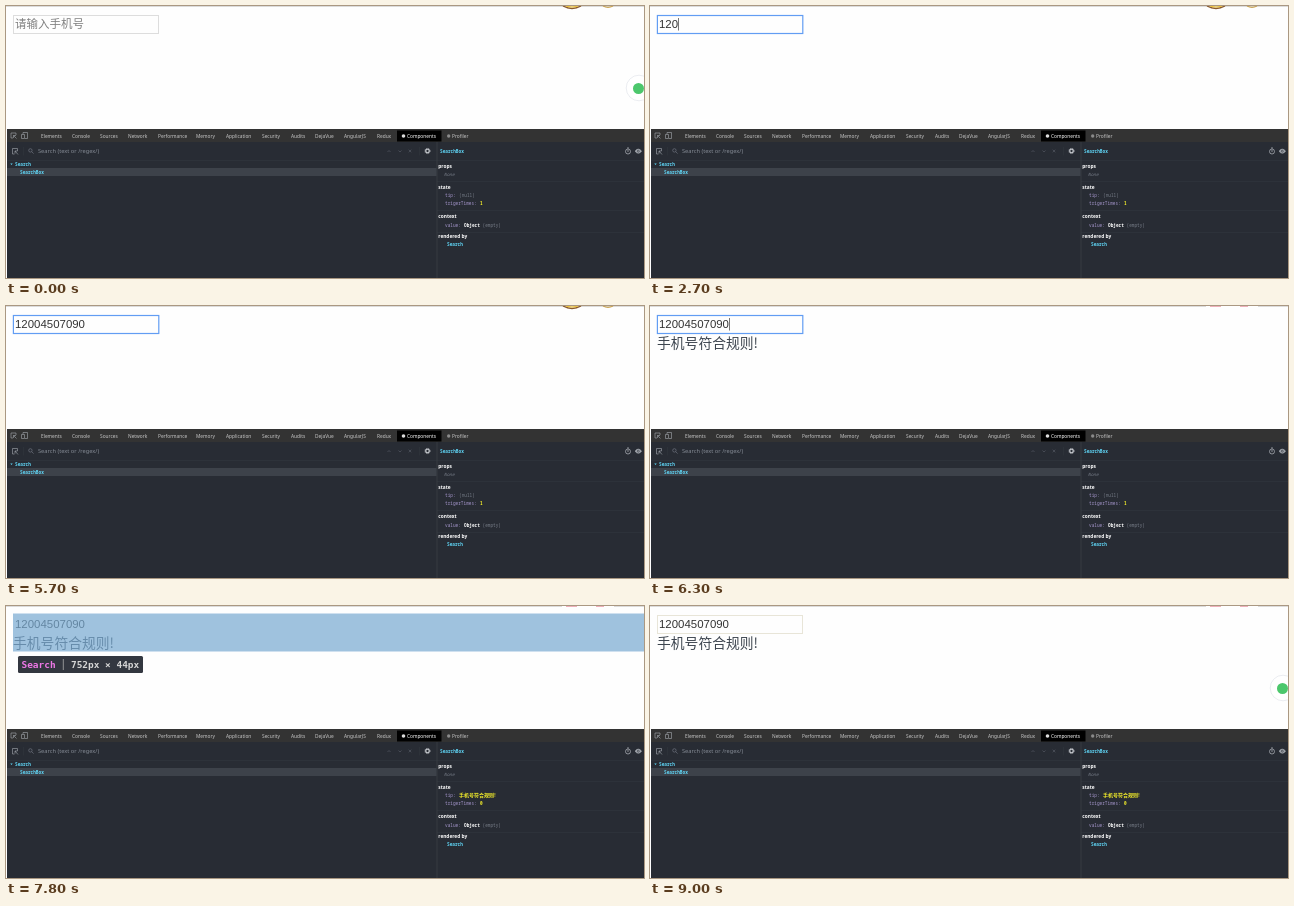
Recreate the animation shown at these times as an HTML page. Size 638 by 272 pixels, loop 9500 ms.

```html
<!DOCTYPE html>
<html>
<head>
<meta charset="utf-8">
<title>Phone input check</title>
<style>
html, body { margin: 0; width: 100%; height: 100%; overflow: hidden; background: #fefefe; }
svg { display: block; width: 638px; height: 272px; }
text { white-space: pre; }
[data-on] { visibility: hidden; }
.cjk { font-family: "Noto Sans CJK SC", "Noto Sans CJK", sans-serif; font-weight: 300; }
.ui { font: 4.8px "Noto Sans", sans-serif; fill: #c8c8c8; }
.head { font: bold 4.8px "Noto Sans", sans-serif; fill: #fff; }
.mono { font: 4.42px "Noto Sans Mono", "DejaVu Sans Mono", monospace; }
.tag { fill: #61dafb; font-weight: 600; }
.key { fill: #a596cc; }
.dim { fill: #777d88; }
.val { fill: #f4ee2a; font-weight: 600; }
.line { stroke: #3d424a; stroke-width: .7; fill: none; }
.faint { stroke: #30353d; }
.icon { stroke: #a5a9b0; stroke-width: .6; fill: none; }
</style>
</head>
<body>
<svg viewBox="0 0 638 272">
  <path d="M0 .5H638" stroke="#dcdcdc"/>

  <!-- Edge of the page content above -->
  <g data-on="0-6000" fill="none">
    <path d="M557 0Q566 5 575 0" stroke="#8a5a2c" stroke-width="1.4"/>
    <path d="M560 0Q566 2 572 0" stroke="#f0c232" stroke-width="1.2"/>
    <path d="M597 0Q602 2.6 607 0" stroke="#c9a455" stroke-width="1.3"/>
  </g>
  <g data-on="6000-9500">
    <path d="M556 .5H608" stroke="#fefefe"/>
    <path d="M560 .5H571M590 .5H598" stroke="#eeb0ba"/>
  </g>

  <!-- Floating button -->
  <g id="badge">
    <circle cx="633" cy="82" r="12.8" fill="#fff" stroke="#e6e9ee" stroke-width=".8"/>
    <circle cx="632.5" cy="82.5" r="5.5" fill="#4cc76c"/>
  </g>

  <!-- Phone field -->
  <rect data-on="0-800" x="7.5" y="9.5" width="145" height="18" fill="none" stroke="#dddddd"/>
  <rect data-on="8000-9500" x="7.5" y="9.5" width="145" height="18" fill="none" stroke="#e8e5d8"/>
  <rect data-on="800-7100" x="7.4" y="9.5" width="145.4" height="18" fill="none" stroke="#629df3" stroke-width="1.2"/>
  <text data-on="0-2100" class="cjk" x="9" y="22.3" font-size="11.5" fill="#808080">请输入手机号</text>
  <text id="phone" x="9" y="22" font-family="Liberation Sans, Arial, sans-serif" font-size="11.45" fill="#333"></text>
  <rect data-on="800-1300" x="9" y="12" width="1" height="13" fill="#333"/>
  <rect data-on="1800-2100" x="8" y="12" width="2" height="13" fill="#000"/>
  <rect id="caret" data-on="2100-5700 6200-6600" y="12" width=".8" height="12.5" fill="#555"/>
  <text data-on="6200-9500" class="cjk" x="7" y="42.4" font-size="13.8" fill="#3c444e">手机号符合规则!</text>

  <!-- Element highlight -->
  <g data-on="7800-8000">
    <rect x="7" y="7.5" width="631" height="38" fill="rgb(120,170,210)" fill-opacity=".7"/>
    <rect x="12" y="50" width="125" height="17" rx="1.5" fill="#333740"/>
    <path d="M57.3 53V64" stroke="#aaa" stroke-width=".8"/>
    <g font-family="DejaVu Sans Mono, monospace" font-weight="bold" font-size="9.45">
      <text x="15.5" y="62" fill="#ee78e6">Search</text>
      <text x="65" y="62" fill="#d7d7d7">752px × 44px</text>
    </g>
  </g>

  <!-- Developer tools -->
  <rect x="1" y="123" width="637" height="149" fill="#282c34"/>
  <rect x="1" y="123" width="637" height="13" fill="#333"/>
  <rect x="391" y="124.5" width="44.5" height="11" fill="#000"/>
  <g id="tabs" class="ui"></g>
  <circle cx="397.5" cy="130" r="1.8" fill="#ddd"/>
  <circle cx="442.7" cy="130" r="1.7" fill="#8a8a8a"/>
  <g class="icon">
    <path d="M10 129V127H5V132H7M7.5 129.5L10.5 132.5M7.5 132V129.5H10"/>
    <path d="M17 128V126.5H21.5V132.5H19M15.5 128.5H18.5V132.5H15.5Z"/>
    <path d="M11.5 145V142.5H6.5V148H8.5M9 145L12 148.5M9 147.5V145H11.5"/>
    <circle cx="24.4" cy="144.4" r="1.7" stroke="#777d88"/>
    <path d="M25.7 145.7L27.6 147.6" stroke="#777d88"/>
    <path d="M381.5 146L383 144.5L384.5 146M392.5 144.5L394 146L395.5 144.5M402.7 143.7L405.3 146.3M405.3 143.7L402.7 146.3" stroke="#5b616b"/>
    <circle cx="421.5" cy="145" r="1.8" stroke="#c4c7cc" stroke-width="1.3"/>
    <circle cx="421.5" cy="145" r="2.7" stroke="#c4c7cc" stroke-dasharray="1.1"/>
    <circle cx="622" cy="145.5" r="2.5" stroke-width=".8"/>
    <path d="M621 142H623M622 144V146" stroke-width=".8"/>
    <path d="M629 145.2Q632.3 141 635.6 145.2Q632.3 149.4 629 145.2Z" fill="#a5a9b0"/>
    <circle cx="632.3" cy="145.2" r="1" fill="#a5a9b0" stroke="#282c34"/>
  </g>
  <text class="ui" x="32" y="147" style="font-size:5.7px;fill:#858b95">Search (text or /regex/)</text>
  <path class="line faint" d="M1 154.5H638M17.5 141V149.5M413.5 141V149.5M431 175.5H638M431 204.5H638M431 226.5H638"/>
  <path class="line" d="M431 136V272"/>
  <rect x="1" y="162" width="429.5" height="8" fill="#3d424a"/>
  <path d="M4.3 157.4H6.7L5.5 159Z" fill="#61dafb"/>
  <g class="mono">
    <text class="tag" x="9" y="159.8">Search</text>
    <text class="tag" x="14" y="167.8">SearchBox</text>
    <text class="tag" x="434" y="147">SearchBox</text>
    <text class="dim" x="438" y="169.5" font-style="italic">None</text>
    <text class="key" x="439" y="191">tip:</text>
    <text data-on="0-7100" class="dim" x="453" y="191">(null)</text>
    <text class="key" x="439" y="199">trigerTimes:</text>
    <text data-on="0-7100" class="val" x="474" y="199">1</text>
    <text data-on="7100-9500" class="val" x="474" y="199">0</text>
    <text class="key" x="439" y="220.5">value:</text>
    <text x="458" y="220.5" fill="#fff" font-weight="bold">Object</text>
    <text class="dim" x="476.5" y="220.5">(empty)</text>
    <text class="tag" x="441" y="239.5">Search</text>
  </g>
  <text data-on="7100-9500" class="cjk" x="453" y="191" font-size="5" fill="#f4ee2a" style="font-weight:700">手机号符合规则!</text>
  <g class="head">
    <text x="432.3" y="162">props</text>
    <text x="432.3" y="182.5">state</text>
    <text x="432.3" y="211.7">context</text>
    <text x="432.3" y="232.2">rendered by</text>
  </g>
</svg>
<script>
const LOOP = 9500;
const NUMBER = "12004507090";
const keyTimes = [2100, 2400, 2700, 3000, 3300, 3600, 4000, 4400, 4600, 4900, 5200];
const tabs = {
  Elements: 35, Console: 66, Sources: 94, Network: 122, Performance: 152,
  Memory: 190, Application: 220, Security: 256, Audits: 285, DejaVue: 309,
  AngularJS: 338, Redux: 371, Components: 401, Profiler: 446
};
const byId = id => document.getElementById(id);

for (const [name, x] of Object.entries(tabs)) {
  const label = document.createElementNS(byId("tabs").namespaceURI, "text");
  label.textContent = name;
  label.setAttribute("x", x);
  label.setAttribute("y", 131.8);
  if (name === "Components") label.style.fill = "#fff";
  byId("tabs").append(label);
}

const timed = [...document.querySelectorAll("[data-on]")].map(el => ({
  el, spans: el.dataset.on.split(" ").map(span => span.split("-").map(Number))
}));

function badgeOpacity(t) {
  if (t < 100 || t >= 9000) return 1;
  return t < 200 || t >= 8900 ? 0.5 : 0;
}

function draw(now) {
  const t = now % LOOP;
  for (const { el, spans } of timed) {
    const on = spans.some(([from, to]) => t >= from && t < to);
    el.style.visibility = on ? "visible" : "hidden";
  }
  const typed = keyTimes.filter(time => time <= t).length;
  byId("phone").textContent = NUMBER.slice(0, typed);
  byId("caret").setAttribute("x", 9 + typed * 6.37);
  byId("badge").style.opacity = badgeOpacity(t);
}

const start = performance.now();
function tick() {
  draw(performance.now() - start);
  requestAnimationFrame(tick);
}
tick();
</script>
</body>
</html>
```
